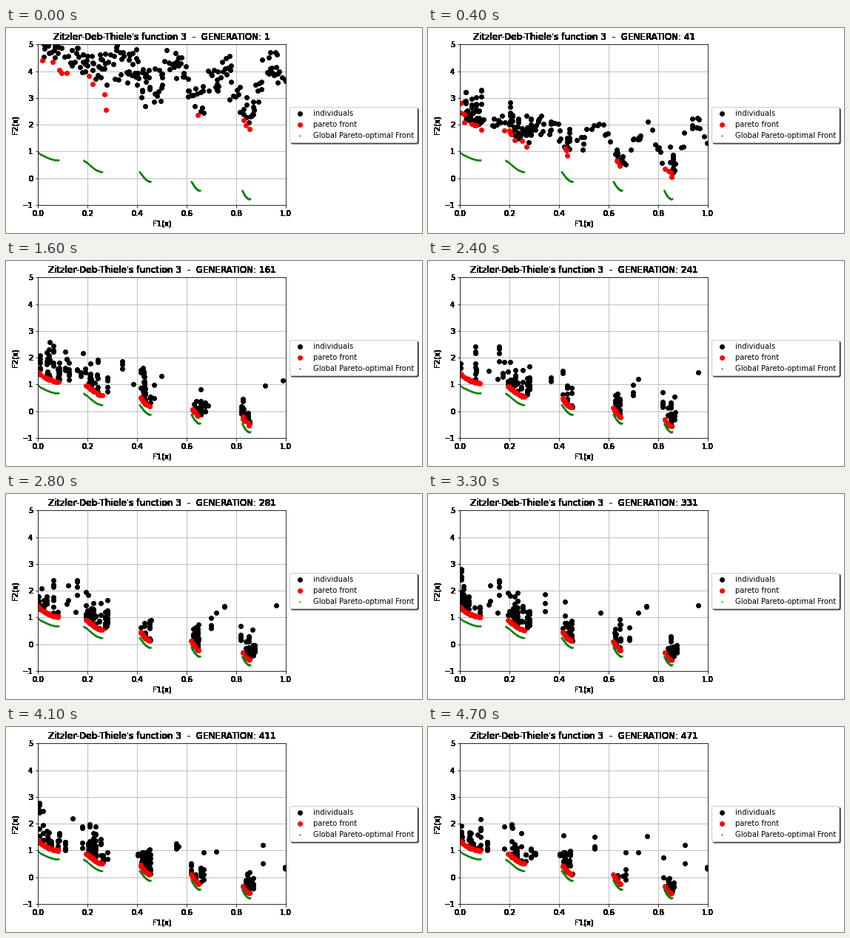
Recreate the animation shown at these times as a matplotlib script. Size 562 px wide and 278 px high, loop 4800 ms.

```python
import numpy as np
import matplotlib.pyplot as plt
from matplotlib.animation import FuncAnimation

W, H, DPI = 562, 278, 72
FRAMES, STEP = 48, 10

# Pieces of the optimal front, and (centre, spread) of the crowds above them.
SEGMENTS = np.array([(0, .083), (.183, .258), (.409, .454), (.618, .653), (.823, .855)])
NICHES = np.array([(0, .06), (.225, .032), (.436, .012), (.642, .016), (.843, .013)])
SHARES = [.28, .28, .17, .14, .13]


def zdt3(x, g):
    return g - np.sqrt(x * g) - x * np.sin(10 * np.pi * x)


def front_depth(k):
    """Best distance value g in frame k: a fast drop, then slow progress."""
    return 1.27 + .25 * np.exp(-k / 20) + 3.3 * np.exp(-k / 3)


def make_founders(n=250):
    rng = np.random.default_rng(11)
    g = 1 + 9 * rng.random((n, 30)).mean(axis=1)
    death = 1 + 8 * rng.random(n) ** 1.5
    return rng.random(n), g / front_depth(0), death


def make_families(n=265):
    """Members share x and differ in how far they lie behind the front."""
    rng = np.random.default_rng(5)
    rows = []
    for _ in range(n):
        if rng.random() < .8:
            centre, spread = NICHES[rng.choice(len(NICHES), p=SHARES)]
            x = abs(rng.normal(centre, spread))
            size = rng.integers(2, 9)
        else:
            x = rng.uniform(.1, 1)
            size = rng.integers(1, 4)
        birth = max(rng.uniform(-8, FRAMES), rng.uniform(1, 9))
        death = birth + rng.uniform(5, 14)
        reach = rng.uniform(.4, 1.7)
        for _ in range(size):
            rows.append((x, .06 + reach * rng.random(),
                         birth + rng.random(), death + rng.random()))
    return np.array(rows).T


def make_elite(n=100):
    rng = np.random.default_rng(3)
    length = np.diff(SEGMENTS).ravel()
    i = rng.choice(len(SEGMENTS), n, p=length / length.sum())
    x = SEGMENTS[i, 0] + length[i] * rng.random(n)
    return x, 1.06 - .06 * x + rng.uniform(-.012, .012, n)


FOUNDERS, FAMILIES, ELITE = make_founders(), make_families(), make_elite()


def population(k):
    g = front_depth(k)
    fx, ratio, death = FOUNDERS
    old = k < death
    x, excess, birth, end = FAMILIES
    new = (birth <= k) & (k < end)
    ex, lift = ELITE
    n = int(len(ex) * min(1, k / 25))
    xs = np.concatenate([fx[old], x[new], ex[:n]])
    gs = np.concatenate([g * ratio[old], g + excess[new], g * lift[:n]])
    return xs, zdt3(xs, gs)


def non_dominated(x, y):
    no_worse = (x[:, None] <= x) & (y[:, None] <= y)
    better = (x[:, None] < x) | (y[:, None] < y)
    return ~(no_worse & better).any(axis=0)


def solid(img, dpi):
    """Give text hard edges by making every touched pixel opaque."""
    img = img.copy()
    img[..., 3] = img[..., 3] > 0
    return img, 0, 0


fig = plt.figure(figsize=(W / DPI, H / DPI), dpi=DPI, facecolor="white")
ax = fig.add_axes([43.3 / W, 38.15 / H, 334.8 / W, 217.44 / H])
ax.set(xlim=(0, 1), ylim=(-1, 5), xlabel="F1(x)", ylabel="F2(x)")
ax.grid(True)

crowd, = ax.plot([], [], "ko", label="individuals")
best, = ax.plot([], [], "ro", label="pareto front")
gx = np.concatenate([np.linspace(max(lo, .001), hi, 60) for lo, hi in SEGMENTS])
ax.plot(gx, zdt3(gx, 1), "g.", ms=2, label="Global Pareto-optimal Front")
ax.legend(loc="center left", bbox_to_anchor=(1, .5), fancybox=True,
          framealpha=1, shadow={"alpha": 1})

for text in [ax.title, ax.xaxis.label, ax.yaxis.label,
             *ax.get_xticklabels(), *ax.get_yticklabels()]:
    text.set_agg_filter(solid)


def update(k):
    x, y = population(k)
    top = non_dominated(x, y)
    crowd.set_data(x[~top], y[~top])
    best.set_data(x[top], y[top])
    ax.set_title(f"Zitzler-Deb-Thiele's function 3  -  GENERATION: {1 + STEP * k}")
    return crowd, best


anim = FuncAnimation(fig, update, frames=FRAMES, interval=100,
                     repeat=True, repeat_delay=0, blit=False)
plt.show()
```
